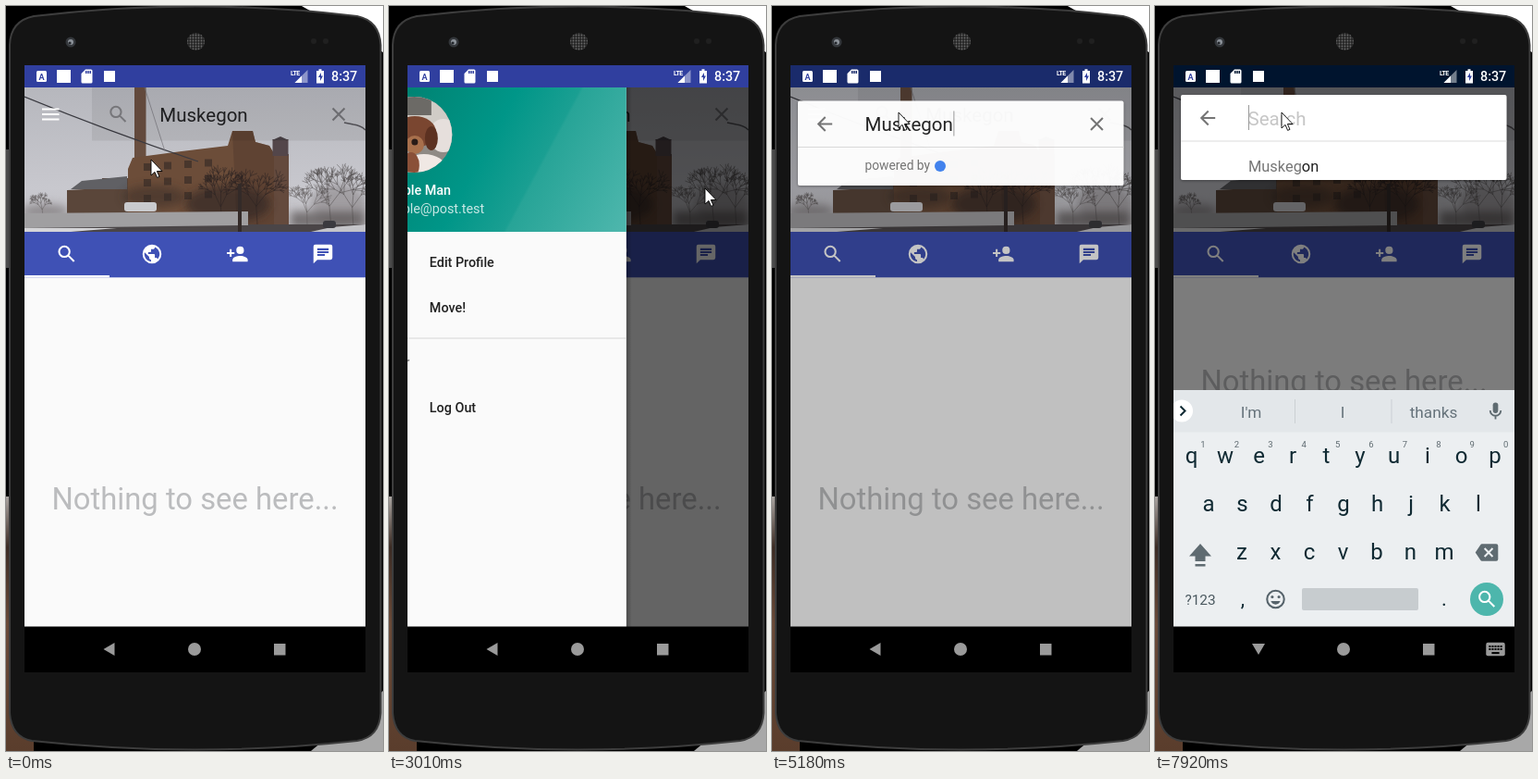
Animation of 408 by 805 pixels, one loop 8 s. Source, as an HTML page:

```html
<!DOCTYPE html>
<html lang="en">
<head>
<meta charset="utf-8">
<title>City search on a phone</title>
<style>
  html, body { margin: 0; width: 100%; height: 100%; overflow: hidden; background: #000; }
  svg { display: block; width: 100vw; height: 100vh; font-family: Roboto, "Open Sans", sans-serif; }
  text { white-space: pre; }
</style>
</head>
<body>
<svg id="stage" viewBox="0 0 408 805"></svg>
<script>
const LOOP = 8000;
const DP = 1.025;

// ---------- drawing helpers ----------
const rect = (x, y, w, h, fill, more = '') =>
  `<rect x="${x}" y="${y}" width="${w}" height="${h}" fill="${fill}" ${more}/>`;
const circle = (x, y, r, fill, more = '') =>
  `<circle cx="${x}" cy="${y}" r="${r}" fill="${fill}" ${more}/>`;
const oval = (x, y, rx, ry, fill, more = '') =>
  `<ellipse cx="${x}" cy="${y}" rx="${rx}" ry="${ry}" fill="${fill}" ${more}/>`;
const path = (d, fill, more = '') => `<path d="${d}" fill="${fill}" ${more}/>`;
const line = (d, stroke, width, more = '') =>
  path(d, 'none', `stroke="${stroke}" stroke-width="${width}" ${more}`);
const text = (x, y, size, fill, str, more = '') =>
  `<text x="${x}" y="${y}" font-size="${size}" fill="${fill}" ${more}>${str}</text>`;
const mid = 'text-anchor="middle"', medium = 'font-weight="500"', soft = 'filter="url(#blur)"';

const ink = (d, w = 2) => line(d, 'currentColor', w);
const solid = d => path(d, 'currentColor', 'fill-rule="evenodd"');
const ICONS = {
  search: ink('M15 9.5a5.5 5.5 0 1 1-11 0a5.5 5.5 0 1 1 11 0M13.6 13.6l6.2 6.2'),
  close: ink('M5.7 5.7L18.3 18.3M18.3 5.7L5.7 18.3'),
  back: ink('M20 12H5.5M12.7 4.7L5.4 12l7.3 7.3'),
  globe: solid('M12 2a10 10 0 1 0 0 20a10 10 0 1 0 0-20zm-1 17.93c-3.95-.49-7-3.85-7-7.93 0-.62.08-1.21.21-1.79L9 15v1' +
    'c0 1.1.9 2 2 2zm6.9-2.54c-.26-.81-1-1.39-1.9-1.39h-1v-3c0-.55-.45-1-1-1H8v-2h2c.55 0 1-.45 1-1V7h2' +
    'c1.1 0 2-.9 2-2v-.41c2.93 1.19 5 4.06 5 7.41 0 2.08-.8 3.97-2.1 5.39z'),
  addUser: circle(15, 8, 4, 'currentColor') + ink('M5 7v8M1 11h8') +
    solid('M7 20v-2c0-2.7 5.3-4 8-4s8 1.3 8 4v2z'),
  chat: solid('M4 2h16q2 0 2 2v12q0 2-2 2H6l-4 4V4q0-2 2-2zM6 6v2h12V6zM6 9v2h12V9zM6 12v2h8v-2z'),
  edit: solid('M3 17.2V21h3.8L17.8 9.9l-3.7-3.7zM20.7 7q.7-.7 0-1.4l-2.3-2.3q-.7-.7-1.4 0l-1.9 1.8 3.8 3.8z'),
  city: solid('M15 11V5l-3-3-3 3v2H3v14h18V11z') +
    line('M6 9v11M12 5v15M18 13v7', '#fafafa', 2, 'stroke-dasharray="2 2"'),
  exit: ink('M4 9V4h16v16H4v-5M3 12h12M10.8 7.7l4.3 4.3-4.3 4.3'),
  mic: rect(9, 2, 6, 12, 'currentColor', 'rx="3"') + ink('M5.9 11a6.1 6 0 0 0 12.2 0M12 17v4', 1.9),
  keyboard: solid('M4 5h16q2 0 2 2v10q0 2-2 2H4q-2 0-2-2V7q0-2 2-2z') +
    line('M5 9h14M5 12h14', '#000', 2, 'stroke-dasharray="2 1"') + line('M8 16h8', '#000', 2),
  erase: solid('M22 3H7q-1 0-1.6.9L0 12l5.4 8.1Q6 21 7 21h15q2 0 2-2V5q0-2-2-2z') +
    line('M9.7 7.7l8.6 8.6M18.3 7.7l-8.6 8.6', '#eceff1', 2),
  smile: ink('M21 12a9 9 0 1 1-18 0a9 9 0 1 1 18 0') + solid('M7 14h10q-1.5 3.5-5 3.5T7 14z') +
    circle(8.5, 9.5, 1.5, 'currentColor') + circle(15.5, 9.5, 1.5, 'currentColor'),
  card: solid('M10 2h8q2 0 2 2v16q0 2-2 2H6q-2 0-2-2V8zM10 4v4h2V4zM13 4v4h2V4zM16 4v4h2V4z')
};
const icon = (name, x, y, color, s = DP) =>
  `<g transform="translate(${x} ${y}) scale(${s}) translate(-12 -12)" color="${color}">${ICONS[name]}</g>`;

let seed = 7;
const rnd = () => (seed = seed * 16807 % 2147483647) / 2147483647;

// A bare tree: a branch that forks into shorter ones.
function branch(x, y, len, angle, depth) {
  const ex = x + len * Math.sin(angle), ey = y - len * Math.cos(angle);
  const d = `M${x.toFixed(1)} ${y.toFixed(1)}L${ex.toFixed(1)} ${ey.toFixed(1)}`;
  if (!depth) return d;
  return d + [-.5, .05, .55].map(turn =>
    branch(ex, ey, len * (.6 + rnd() * .25), angle + turn + (rnd() - .5) * .4, depth - 1)).join('');
}
const tree = (x, y, h, color, opacity) =>
  line(branch(x, y, h * .34, (rnd() - .5) * .2, 4), color, .7, `opacity="${opacity}"`);

// ---------- scenery ----------
const phone = () => rect(0, 0, 408, 805, '#000') +
  path('M320 0H408V50Z', '#fff') +
  rect(0, 155, 4, 128, '#4a4a4a') + rect(0, 530, 30, 275, 'url(#wood)') + path('M408 740V805H330Z', '#a8a8a8') +
  path('M4 42Q5 16 30 11Q205 -10 380 11Q404 16 405.500 42V764Q404 790 380 794Q205 813 28 794Q6 790 4 764Z',
    '#141414', 'stroke="#3d3d3d" stroke-width="2"') +
  circle(70, 39, 5.5, '#34373b') + circle(70, 39, 3, '#8c9299') + circle(69, 40, 1.6, '#23262b') +
  circle(205.5, 38.5, 9.5, '#242424') + circle(205.5, 38.5, 9.5, 'url(#mesh)') +
  circle(333, 38, 3, '#202020') + circle(346, 38, 3, '#202020');

const statusBar = () => rect(20, 64, 369, 24, '#303f9f', 'id="status"') +
  rect(33, 70, 11, 12, '#fff', 'rx="1.500"') + text(38.5, 79.5, 9, '#303f9f', 'A', mid + ' font-weight="700"') +
  rect(55, 69, 15, 14, '#fff') + icon('card', 87.5, 76, '#fff', .75) + rect(106, 70, 12, 12, '#fff') +
  text(308, 75, 7, '#fff', 'LTE', 'font-weight="700" letter-spacing="-.6"') +
  path('M326.500 69V83H312.500Z', '#fff', 'opacity=".45"') + path('M320 75.500V83H312.500Z', '#fff') +
  path('M336 70h2.500v-1.700h3V70H344v13.500h-8z', '#fff') + path('M341 72l-3 5h2v4l3-5.500h-2z', '#303f9f') +
  text(352, 81.3, 14.35, '#fff', '8:37', medium);

function photo() {
  let panes = '';
  for (let r = 0; r < 3; r++)
    for (let c = 0; c < 4; c++)
      panes += rect(149 + c * 22, 170 + r * 17 - c * 1.5, 8, 8, '#3d2f29', 'opacity=".75"');
  return rect(20, 88, 369, 156, 'url(#sky)') +
    oval(42, 222, 26, 8, '#6f6a6c', `opacity=".6" ${soft}`) + tree(40, 228, 24, '#5a5456', .6) +
    oval(360, 214, 30, 22, '#7d7779', `opacity=".5" ${soft}`) + rect(308, 222, 81, 18, '#55504f', `opacity=".7" ${soft}`) +
    tree(352, 240, 70, '#4a4446', .65) + tree(376, 240, 66, '#4a4446', .65) + tree(326, 238, 44, '#5a5456', .6) +
    path('M66 224V199L104 197V186H134V224Z', '#5a463a') + path('M70 198L82 189L131 184V198Z', '#606064') +
    rect(139, 88, 12.5, 92, '#694f40') +
    path('M132 226V176L137 164L190 157L240 151L245 135H267L270 147L285 151L306 186V239H250Z', '#6c4d39') +
    path('M245 135H267L270 147L285 151L306 186V239H250Z', '#573d2f', 'opacity=".6"') + panes +
    rect(290, 160, 16, 78, '#644a3d') + rect(288.5, 144, 17, 18, '#53464a') +
    path('M288 145L297 141L306 145Z', '#494145') +
    oval(240, 214, 46, 20, '#2a2221', `opacity=".6" ${soft}`) + oval(160, 206, 34, 12, '#352a26', `opacity=".5" ${soft}`) +
    tree(234, 236, 56, '#2a2221', .7) + tree(272, 236, 58, '#2a2221', .7) +
    rect(20, 236, 369, 8, '#4a4547') + path('M20 224L262 222V237L20 240Z', '#a09fa1') +
    path('M20 240H120L70 244H20Z', '#d5d5d8') +
    rect(128, 212, 35, 10, '#c9cacd', 'rx="3"') + rect(251, 192, 4, 52, '#332a28') +
    path('M330 244L352 239L389 236V244Z', '#c4c4c8') + rect(343, 232, 14, 8, '#3b3a3f', 'rx="3"') +
    line('M20 98Q110 135 208 168', '#3a3a40', 1.3) + line('M150 88L172 157', '#77767b', .7) +
    line('M366 126L376 128Q384 129 389 134', '#555459', 1.6);
}

const home = () => photo() +
  rect(93, 88, 296, 57.5, '#000', 'opacity=".07"') +
  line('M39 111.500H57.500M39 117H57.500M39 122.500H57.500', '#fff', 2) +
  icon('search', 121.5, 117, '#76767a') + text(166.3, 125, 20.5, '#1f1f21', 'Muskegon') +
  icon('close', 360, 117, '#6c6c70') +
  rect(20, 244, 369, 427, '#fafafa') + rect(20, 244, 369, 49.3, '#3f51b5') + rect(20, 291, 92, 2.3, '#fff') +
  icon('search', 65.7, 268, '#fff') + icon('globe', 158, 268, '#fff') +
  icon('addUser', 250.3, 268, '#fff') + icon('chat', 343, 268, '#fff') +
  text(204.5, 544, 32.8, '#bbbcbe', 'Nothing to see here...', mid + ' id="empty"');

const avatar = () => '<g clip-path="url(#face)">' + rect(28, 97, 84, 84, '#8f8a85') +
  rect(28, 97, 84, 30, '#d0ccc6') + rect(56, 98, 32, 20, '#6c6a66') +
  oval(101, 140, 16, 18, '#e6dfdc') + oval(44, 168, 22, 18, '#c79a86') +
  oval(70, 136, 23, 17, '#7a4630') + oval(52, 143, 7, 14, '#5c3121') + oval(88, 143, 7, 13, '#5c3121') +
  oval(70, 150, 10, 10, '#a8704c') + circle(70, 147, 3.5, '#2a1c18') +
  oval(80, 175, 24, 15, '#f0e8e4') + oval(66, 172, 9, 14, '#8a5038') + '</g>';

const item = (name, y, label) => icon(name, 40.5, y, '#757575') + text(86, y + 5, 14.35, '#212121', label, medium);
const drawer = () => rect(299, 88, 6, 583, 'url(#edge)') + rect(20, 88, 279, 583, '#fafafa') +
  rect(20, 88, 279, 156, 'url(#teal)') + avatar() +
  text(29, 204, 14.35, '#fff', 'Sample Man', medium) +
  text(29, 223.5, 14.35, '#fff', 'sample@post.test', 'fill-opacity=".78"') +
  item('edit', 277, 'Edit Profile') + item('city', 326, 'Move!') +
  rect(20, 358.5, 279, 1, '#d8d8d8') + text(29, 390, 14.35, '#777', 'Other', medium) +
  item('exit', 434, 'Log Out');

const panel = () =>
  `<rect id="sheet" x="28" y="96" width="352.500" rx="2" fill="#fff" filter="url(#lift)"/>` +
  icon('back', 57, 121, '#757575') + `<g id="clear">${icon('close', 351.5, 121, '#757575')}</g>` +
  rect(28, 145.5, 352.5, 1, '#dcdcdc') +
  text(100.5, 129, 20.5, '#212121', '', 'id="query"') +
  rect(101, 130.3, 0, 1.2, '#212121', 'id="under"') + rect(101, 107, 1, 27, '#9a9a9a', 'id="caret"') +
  '<g id="list"></g>';

const KEY = '#102a33';
const keyRow = (keys, x, y) => [...keys].map((k, i) => text(x + i * 36.5, y, 24, KEY, k, mid)).join('');
const keyboard = () => rect(20, 415, 369, 256, '#eceff1') + rect(20, 415, 369, 45.5, '#e3e7ea') +
  circle(29, 437.5, 12, '#fff') + line('M27.500 432.500l5 5-5 5', KEY, 2) +
  rect(151, 425, 1, 26, '#cbd0d3') + rect(255.5, 425, 1, 26, '#cbd0d3') + '<g id="words"></g>' +
  icon('mic', 368.5, 438, '#5f6b71', .95) +
  keyRow('qwertyuiop', 39.5, 494) + keyRow('asdfghjkl', 58, 546) + keyRow('zxcvbnm', 94, 598) +
  [...'1234567890'].map((k, i) => text(52 + i * 36.4, 477, 9.5, '#5f6b71', k, mid)).join('') +
  path('M49 581L61 594.500H54.500V600H43.500V594.500H37Z', '#5f6b71') + rect(43.5, 603, 11, 2.5, '#5f6b71') +
  icon('erase', 359, 590.5, '#5f6b71') +
  text(49, 646.5, 15.4, '#4a585f', '?123', mid) + text(95, 648, 22, KEY, ',', mid) +
  icon('smile', 130.5, 641, '#55626a') + rect(159, 629, 126, 24, '#c7cccf', 'rx="2"') +
  text(313, 648, 22, KEY, '.', mid) + circle(359, 641, 18, '#4db6ac') + icon('search', 359.3, 641, '#fff');

const navBar = () => rect(20, 670.5, 369, 49.5, '#000') +
  path('M105.500 695L117.500 688V702Z', '#9a9a9a', 'id="navBack"') +
  path('M105 689H119L112 701Z', '#9a9a9a', 'id="navDown"') +
  circle(204, 695, 7, '#9a9a9a') + rect(290, 689, 12.5, 12.5, '#9a9a9a') +
  `<g id="navKeys">${icon('keyboard', 368.5, 695, '#9a9a9a')}</g>`;

const stops = (...s) => s.map(([o, c, a = 1]) => `<stop offset="${o}" stop-color="${c}" stop-opacity="${a}"/>`).join('');
document.getElementById('stage').innerHTML = `<defs>
  <linearGradient id="sky" x2="0" y2="1">${stops([0, '#b6b7bd'], [.7, '#c8c8ce'], [1, '#c0bec2'])}</linearGradient>
  <linearGradient id="wood" x2="0" y2="1">${stops([0, '#a9a4a0'], [.2, '#3c2c24'], [.5, '#6a4a38'], [1, '#5a3d2c'])}</linearGradient>
  <linearGradient id="edge">${stops([0, '#000', .25], [1, '#000', 0])}</linearGradient>
  <linearGradient id="teal" gradientUnits="userSpaceOnUse" x1="30" y1="110" x2="290" y2="250">
    ${stops([0, '#00806f'], [.42, '#009688'], [.62, '#1a9f92'], [.63, '#27a497'], [1, '#4db6ac'])}</linearGradient>
  <pattern id="mesh" width="3" height="3" patternUnits="userSpaceOnUse">${circle(1.5, 1.5, .9, '#6b6b6b')}</pattern>
  <filter id="blur" x="-30%" y="-60%" width="160%" height="220%"><feGaussianBlur stdDeviation="5"/></filter>
  <filter id="lift" x="-5%" y="-10%" width="110%" height="125%">
    <feDropShadow dx="0" dy="1" stdDeviation="1.500" flood-opacity=".35"/></filter>
  <clipPath id="face">${circle(69.5, 139, 41, '#000')}</clipPath>
  <clipPath id="view">${rect(20, 88, 369, 583, '#000')}</clipPath></defs>
  ${phone()}${statusBar()}
  <g clip-path="url(#view)">${home()}
    ${rect(20, 88, 369, 583, '#000', 'id="scrim"')}
    <g id="drawer">${drawer()}</g><g id="panel">${panel()}</g><g id="keys">${keyboard()}</g></g>
  ${navBar()}
  ${circle(0, 0, 14, 'none', 'id="ring" stroke="#444" stroke-width="1.500"')}
  ${path('M0 0V17l4-3.600 2.600 6 2.400-1-2.600-5.900h5.600z', '#fff', 'id="cursor" stroke="#000" stroke-width=".9"')}`;

const el = Object.fromEntries([...document.querySelectorAll('[id]')].map(e => [e.id, e]));
const set = (e, attrs) => { for (const k in attrs) e.setAttribute(k, attrs[k]); };
const show = (e, on) => set(e, { display: on ? 'inline' : 'none' });

// ---------- timing ----------
// Each run: first change, last change, number of steps.
const RUNS = [[0, 0, 1], [400, 780, 6], [1010, 1010, 1], [1180, 1780, 9], [1950, 2480, 8], [2630, 2630, 1],
  [2860, 2940, 2], [3010, 3410, 6], [3640, 4020, 6], [4330, 4330, 1], [4560, 4560, 1], [5100, 5330, 4],
  [5480, 5480, 1], [5790, 6200, 6], [6430, 6430, 1], [6580, 6580, 1], [6730, 6730, 1], [6900, 6900, 1],
  [7130, 7280, 3], [7450, 7520, 2], [7690, 7690, 1], [7840, 7920, 2]];
const TICKS = RUNS.flatMap(([a, b, n]) =>
  Array.from({ length: n }, (_, i) => n > 1 ? a + (b - a) * i / (n - 1) : a));

const span = (t, a, b) => Math.max(0, Math.min(1, (t - a) / (b - a)));
const smooth = u => u * u * (3 - 2 * u);
const SLIDE = 512;
const slide = (t, start) => 1 - (1 - span(t, start, start + SLIDE)) ** 5;
const latest = (table, t) => table.filter(r => r[0] <= t).pop();

const MOVES = [[330, 780, -110, -54], [1880, 2480, 295, 85], [3570, 4020, -205, -82]];
const CLICKS = [[1010, 1180], [2630, 2860], [4330, 4560]];
const QUERY = [[0, 8], [6430, 7], [6900, 6], [7130, 5], [7280, 4], [7450, 3], [7520, 2], [7690, 1], [7840, 0]];
const WORDS = [
  [0, 'Muskegon', 'Muskego', 'Musk...There'], [6730, 'Muskego', 'Muskegon', 'Muskegs'],
  [6900, 'Muskeg', 'Muskegs', 'Muskets'], [7130, 'Muske', 'Musket', 'Muskets'],
  [7280, 'Musk', 'Musky', 'Musket'], [7450, 'Mus', 'Must', 'Music'],
  [7520, 'Mu', 'My', 'Me'], [7840, "I'm", 'I', 'thanks']];
const PLACES = ['Muskegon', 'Muskegon Heights', 'Muskegon charter Township', 'Muskego'];

const title = (name, n, y) => text(101, y, 16.4, '#757575',
  `${name.slice(0, n)}<tspan fill="#212121">${name.slice(n)}</tspan>`);
const credit = y => text(100.5, y, 13.8, '#757575', 'powered by') + circle(182, y - 4.5, 6, '#4285f4');

function results(t) {
  if (t < 6430) return credit(171);
  if (t >= 7920) return title('Muskegon', 6, 178.5);
  const n = t < 6900 ? 8 : 6;
  const rows = PLACES.slice(0, t < 6580 ? 3 : 4).map((name, i) => {
    const y = 172 + i * 73.7;
    return title(name, n, y) + text(101.5, y + 20, 14.35, '#7c7c7c', i < 3 ? 'MI, USA' : 'WI, USA');
  }).join('');
  return t < 6730 ? rows + rect(101, 359.5, 279, 1, '#dcdcdc') + credit(385) : rows;
}

function draw(t) {
  let x = 157, y = 166;
  for (const [a, b, dx, dy] of MOVES) {
    const u = smooth(span(t, a, b));
    x += dx * u;
    y += dy * u;
  }
  set(el.cursor, { transform: `translate(${x} ${y})` });
  set(el.ring, { cx: x, cy: y });
  show(el.ring, CLICKS.some(([a, b]) => t >= a && t < b));

  const open = slide(t, 1350) - slide(t, 2993.5);
  set(el.drawer, { transform: `translate(${-279 * (1 - open)} 0)` });
  show(el.drawer, open > .002);

  const p = span(t, 5050, 5325);
  const dim = t < 1950 ? .51 * open : t < 3050 ? .6 : .6 * open;
  set(el.scrim, { opacity: Math.max(dim, .5 * p) });
  const mix = (a, b) => Math.round(a + (b - a) * p);
  set(el.status, { fill: `rgb(${mix(48, 0)},${mix(63, 20)},${mix(159, 46)})` });

  show(el.panel, p > 0);
  set(el.panel, { transform: `translate(0 ${12 * (1 - p)})`, opacity: Math.min(1, p * 2.1) });
  const n = latest(QUERY, t)[1];
  el.query.textContent = n ? 'Muskegon'.slice(0, n) : 'Search';
  set(el.query, { fill: n ? '#212121' : '#c6c6c6' });
  const w = n && p > 0 ? el.query.getComputedTextLength() : 0;
  set(el.under, { width: t >= 5480 ? w : 0 });
  set(el.caret, { x: 101 + w });
  show(el.clear, n > 0);
  set(el.sheet, { height: t < 6430 ? 91.5 : t < 7920 ? 330 : 92 });
  el.list.innerHTML = results(t);

  const typing = t >= 5790, rise = 1 - (1 - span(t, 5740, 6200)) ** 2;
  show(el.keys, typing);
  set(el.keys, { transform: `translate(0 ${256 * (1 - rise)})` });
  set(el.empty, { y: t >= 5870 ? 417 : 544 });
  el.words.innerHTML = latest(WORDS, t).slice(1).map((s, i) =>
    text([104, 203, s.length > 9 ? 297.5 : 301.5][i], 444.5, s.length > 9 ? 13 : 17.2, '#65727a', s, mid)).join('');
  show(el.navBack, !typing);
  show(el.navDown, typing);
  show(el.navKeys, typing);
}

let shown = -1;
function tick() {
  const now = performance.now() % LOOP;
  const t = TICKS.filter(s => s <= now).pop();
  if (t !== shown) draw(shown = t);
  requestAnimationFrame(tick);
}
tick();
</script>
</body>
</html>
```
